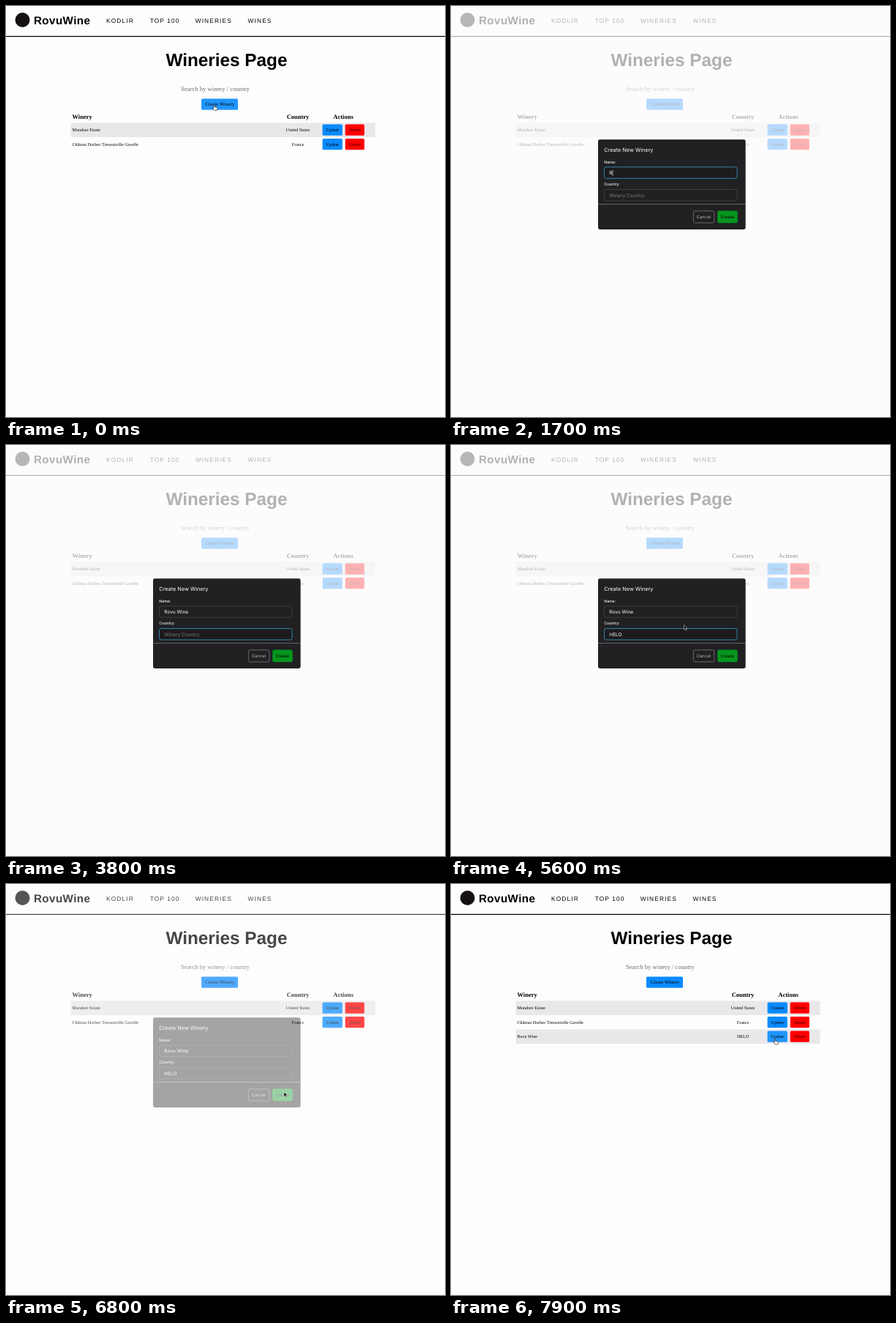
These frames come from a looping animation (600x561 px, 8000 ms). An HTML page:

```html
<!DOCTYPE html>
<html lang="en">
<head>
<meta charset="utf-8">
<title>Wineries Page</title>
<style>
  html, body { margin: 0; width: 100%; height: 100%; overflow: hidden; background: #fefdfe; }
  svg { display: block; width: 100vw; height: 100vh; text-rendering: geometricPrecision; }
  text { white-space: pre; }
  .sans { font-family: "Liberation Sans", Arial, sans-serif; }
  .serif { font-family: "Liberation Serif", Times, serif; }
  .ui { font-family: Inter, sans-serif; }
  .bold { font-weight: 700; }
  .nav { font-size: 8.35px; letter-spacing: 1.12px; }
  .th { font-size: 8.5px; }
  .td { font-size: 6.05px; }
  .label { font-size: 5.2px; font-weight: 500; }
  .input { font-size: 6.5px; }
  .btn { font-size: 5.85px; }
  .mid { text-anchor: middle; }
</style>
</head>
<body>
<svg id="stage" viewBox="0 0 600 561" xmlns="http://www.w3.org/2000/svg"></svg>
<script>
const LOOP = 8000, STEP = 100;
const BLUE = '#0a8bff', BLUE_HOVER = '#2096ff';
const GREEN = '#05961f', GREEN_HOVER = '#22a63a';
const WINERY = 'Rovu Wine', COUNTRY = 'HELO';

const text = (x, y, cls, s, fill = '#000', extra = '') =>
  `<text x="${x}" y="${y}" class="${cls}" fill="${fill}" ${extra}>${s}</text>`;
const rect = (x, y, w, h, fill, r = 0, extra = '') =>
  `<rect x="${x}" y="${y}" width="${w}" height="${h}" rx="${r}" fill="${fill}" ${extra}/>`;

function row(i, name, country) {
  const y = 159.5 + i * 19.5;
  return `<g id="row${i}">` +
    (i % 2 ? '' : rect(88.5, y, 416, 19.5, '#e9e7e9')) +
    text(90.5, y + 11.5, 'serif td', name, '#000', `id="name${i}"`) +
    text(399, y + 11.7, 'serif td mid', country, '#000', `id="land${i}"`) +
    rect(432.5, y + 2.1, 27.3, 15.2, BLUE, 1.6, `id="update${i}"`) +
    text(446.3, y + 11.8, 'serif td mid', 'Update') +
    rect(463.6, y + 2.1, 26.2, 15.2, '#ff0000', 1.6) +
    text(476.8, y + 11.8, 'serif td mid', 'Delete', '#400000') + '</g>';
}

const field = (id, y, label) =>
  text(209.3, y - 5.4, 'ui label', label, '#fff') +
  rect(209.5, y, 181.5, 15.4, '#212022', 2.4, `id="${id}Box" stroke="#444346" stroke-width=".8"`) +
  text(216.3, y + 10.4, 'ui input', '', '#fff', `id="${id}Text"`) +
  rect(0, y + 3.9, .6, 8, '#fff', 0, `id="${id}Caret"`);

const page =
  rect(0, 0, 600, 561, '#fefdfe') +
  '<circle cx="22.5" cy="19" r="10" fill="#151113"/>' +
  text(38, 24.7, 'sans bold', 'RovuWine', '#000', 'font-size="15.2" letter-spacing=".4"') +
  [[137, 'KODLIR'], [196.7, 'TOP 100'], [258.7, 'WINERIES'], [330.6, 'WINES']]
    .map(([x, s]) => text(x, 22.6, 'sans nav', s)).join('') +
  rect(0, 40.9, 600, 1.2, '#000') +
  text(301.5, 81.5, 'sans bold mid', 'Wineries Page', '#000', 'font-size="24.3"') +
  text(239, 116, 'serif', 'Search by winery / country', '#6c6b6c', 'font-size="8.67"') +
  rect(267, 126.5, 50, 15.3, BLUE, 1.6, 'id="open"') +
  text(292.3, 136.3, 'serif mid', 'Create Winery', '#000', 'font-size="6.85"') +
  text(90.5, 153.7, 'serif bold th', 'Winery') +
  text(399, 153.7, 'serif bold th mid', 'Country') +
  text(461, 153.7, 'serif bold th mid', 'Actions') +
  row(0, 'Mundore Estate', 'United States') +
  row(1, 'Château Dorbec Tressonville Gavelle', 'France') +
  row(2, WINERY, COUNTRY);

const modal = '<g id="modal">' +
  rect(0, 0, 600, 561, '#fefdfe', 0, 'opacity=".7"') +
  rect(201, 182.3, 201.6, 122.6, '#212022', 2.4) +
  text(209.3, 198.7, 'ui', 'Create New Winery', '#fff', 'font-size="7.3"') +
  field('name', 219.9, 'Name:') +
  field('land', 250.5, 'Country:') +
  rect(201, 270.1, 201.6, .8, '#77767a') +
  rect(331.3, 279.8, 28.6, 16.2, 'none', 2.4, 'stroke="#7c7b7e" stroke-width=".8"') +
  text(345.4, 290.2, 'ui btn mid', 'Cancel', '#b9b8ba') +
  rect(364.2, 279.5, 27.5, 16.8, GREEN, 2.2, 'id="create"') +
  text(377.7, 290.2, 'ui btn mid', 'Create') + '</g>';

const cursors =
  '<g id="arrow"><path d="M0 0V6.4L1.5 5L2.5 7.3L3.6 6.8L2.6 4.6H4.6Z" fill="#000" stroke="#fff" stroke-width=".5"/></g>' +
  '<g id="hand"><path d="M-.7 .5Q0 -.4 .7 .5V3L3.9 3.8Q4.6 4.2 4.3 5.4L3.6 7.6H0L-2.2 4.8Q-2.2 3.7 -.7 4.5Z" fill="#fff" stroke="#000" stroke-width=".6"/></g>' +
  '<g id="beam"><path d="M-1.3 -3.5Q0 -3.5 0 -2.6V2.6Q0 3.5 -1.3 3.5M1.3 -3.5Q0 -3.5 0 -2.6M0 2.6Q0 3.5 1.3 3.5" fill="none" stroke="#cfcfcf" stroke-width=".6"/></g>';

document.getElementById('stage').innerHTML = page + modal + cursors;

const $ = id => document.getElementById(id);
const clamp = (v, a = 0, b = 1) => Math.min(b, Math.max(a, v));
const ease = p => p * p * (3 - 2 * p);
const show = (id, on) => $(id).setAttribute('visibility', on ? 'visible' : 'hidden');
const fill = (id, color) => $(id).setAttribute('fill', color);
const inside = ([x, y], l, t, r, b) => x >= l && x <= r && y >= t && y <= b;

// Pointer stops: [start, end, x, y]
const moves = [
  [0, 0, 284.6, 134.8],
  [200, 600, 290, 228],
  [5300, 6100, 380, 284],
  [7000, 7900, 443, 211.3]
];

function pointer(t) {
  let [, , x, y] = moves[0];
  for (const [a, b, nx, ny] of moves.slice(1)) {
    const p = ease(clamp((t - a) / (b - a)));
    x += (nx - x) * p;
    y += (ny - y) * p;
  }
  return [x, y];
}

function setField(id, value, hint, focus, caret) {
  const label = $(id + 'Text');
  label.textContent = value || hint;
  label.setAttribute('fill', value ? '#fff' : '#7d7c7f');
  const box = $(id + 'Box');
  box.setAttribute('stroke', focus ? '#3c9cc6' : '#444346');
  box.setAttribute('fill', focus ? '#1c1b1e' : '#212022');
  $(id + 'Caret').setAttribute('x', 216.5 + (value ? label.getComputedTextLength() : 0));
  show(id + 'Caret', caret);
}

function draw(t) {
  const open = t >= 100 && t < 6900;
  show('modal', open);
  $('modal').setAttribute('opacity', t === 100 ? .6 : t === 6800 ? .4 : 1);

  const typed = clamp(Math.floor((t - 1700) / 140) + 1, 0, WINERY.length);
  const onName = t >= 800 && t < 3000;
  const nameCaret = onName && (t < 1400 || t >= 1700);
  setField('name', WINERY.slice(0, typed), 'Winery Name', onName, open && nameCaret);

  const letters = t < 4700 ? 0 : t < 4800 ? 2 : 4;
  const onLand = t >= 3000 && t < 6300;
  const landCaret = onLand && (t < 3500 || (t >= 4700 && t < 5300));
  setField('land', COUNTRY.slice(0, letters), 'Winery Country', onLand, open && landCaret);

  show('row2', t >= 6900);
  for (const id of ['name2', 'land2']) show(id, t >= 7000);

  const at = pointer(t);
  const onOpen = !open && inside(at, 267, 126, 317, 142);
  const onCreate = open && t < 6800 && inside(at, 364, 279, 392, 296);
  const onUpdate = !open && t > 6900 && inside(at, 432, 200, 460, 216);
  const onInput = open && (inside(at, 209, 219, 391, 236) || inside(at, 209, 250, 391, 266));
  fill('open', onOpen ? BLUE_HOVER : BLUE);
  fill('create', onCreate ? GREEN_HOVER : GREEN);
  fill('update2', onUpdate ? BLUE_HOVER : BLUE);

  const hidden = t >= 1400 && t < 5300;
  const kind = onOpen || onCreate || onUpdate ? 'hand' : onInput ? 'beam' : 'arrow';
  for (const id of ['arrow', 'hand', 'beam']) {
    show(id, !hidden && id === kind);
    $(id).setAttribute('transform', `translate(${at[0]} ${at[1]})`);
  }
}

const start = performance.now();
function tick() {
  const t = (performance.now() - start) % LOOP;
  draw(Math.floor(t / STEP) * STEP);
  requestAnimationFrame(tick);
}
tick();
</script>
</body>
</html>
```
